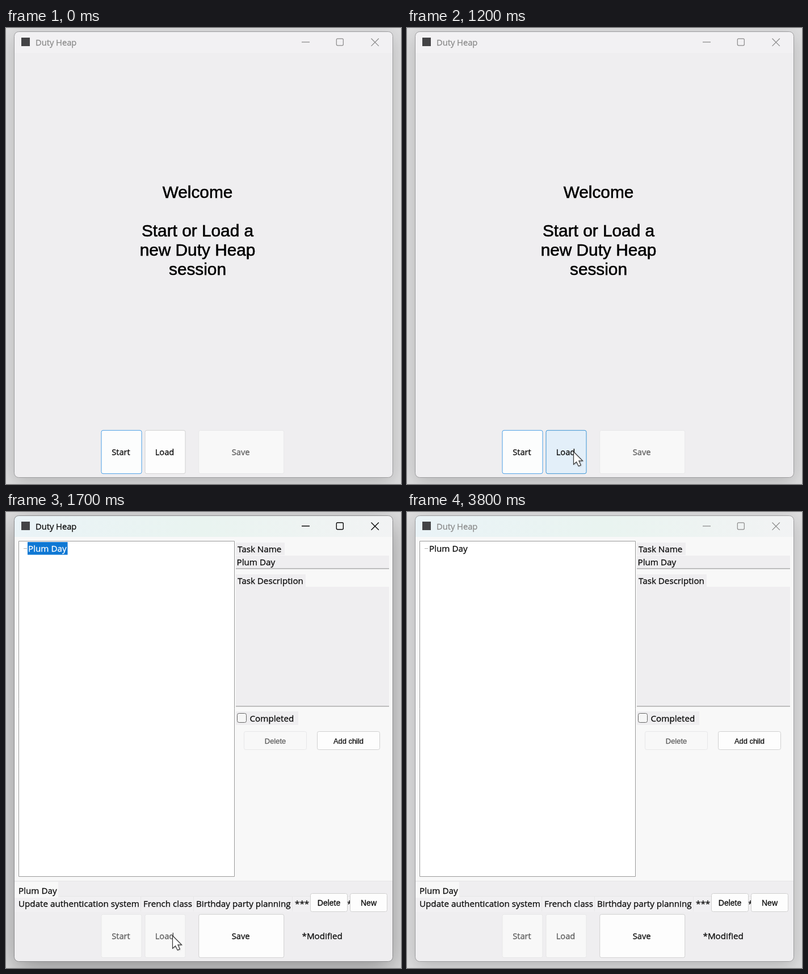
Write an HTML page with a canvas that moves like this. It is 696 by 805 pixels and loops after 3.9 s.

```html
<!DOCTYPE html>
<html lang="en">
<head>
<meta charset="utf-8">
<title>Task window</title>
<style>
html, body { margin: 0; width: 100%; height: 100%; overflow: hidden; background: #dededf; }
canvas { display: block; width: 696px; height: 805px; }
</style>
</head>
<body>
<canvas id="stage" width="696" height="805"></canvas>
<script>
const ctx = document.getElementById('stage').getContext('2d');
const LOOP = 3900, STEP = 100;
const APP = 'Duty Heap', TASK = 'Plum Day', PROJECT = 'Update authentication system';
const UI = '"Open Sans", "Noto Sans", sans-serif';
const SANS = '"Liberation Sans", Arial, sans-serif';
const FACE = '#efeef0', PAGE = '#f8f8f8', INK = '#0a0a0a', DIM = '#5c5c5c';
const BODY = 15.2, LABEL = 14.7, ROW = 22.65;

// [text, depth, done, expandable]
const TREE = [
  [PROJECT, 0, 0, 1],
  ['Obtain permission', 1, 1, 1],
  ['Email Molly', 2, 1, 0],
  ['IAM Roles', 2, 1, 1],
  ['Obtain from Crumbcake', 3, 1, 0],
  ['Make sure they work', 3, 1, 0],
  ['Install dependencies', 1, 0, 1],
  ['Try to compile', 2, 0, 0],
  ['Look for binaries', 2, 0, 0],
  ['Try looking on WQZ', 2, 0, 0],
  ['Figure out what to do from here', 1, 0, 0]
];

// Pointer path: [time, x, y]
const PATH = [
  [500, 572, 797], [600, 562, 772], [700, 470, 768], [800, 372, 761],
  [900, 320, 753], [1000, 301, 749], [1100, 293, 748], [1700, 293, 748],
  [1900, 297, 743], [2200, 300, 740], [2800, 300, 740], [2900, 309, 743], [3000, 350, 746]
];

function box(x, y, w, h, color) {
  ctx.fillStyle = color;
  ctx.fillRect(x, y, w, h);
}

function round(x, y, w, h, r, fill, stroke) {
  ctx.beginPath();
  ctx.roundRect(x, y, w, h, r);
  if (fill) { ctx.fillStyle = fill; ctx.fill(); }
  if (stroke) { ctx.strokeStyle = stroke; ctx.lineWidth = 1; ctx.stroke(); }
}

function line(color, width, ...pts) {
  ctx.beginPath();
  for (let i = 0; i < pts.length; i += 2) ctx.lineTo(pts[i], pts[i + 1]);
  ctx.strokeStyle = color;
  ctx.lineWidth = width;
  ctx.stroke();
}

// A hairline stroke gives the slightly heavier screen type.
function text(str, x, y, size = BODY, color = INK, align = 'left', family = UI) {
  ctx.font = size + 'px ' + family;
  ctx.textAlign = align;
  ctx.fillStyle = ctx.strokeStyle = color;
  ctx.lineWidth = size * .02;
  ctx.fillText(str, x, y);
  ctx.strokeText(str, x, y);
  return ctx.measureText(str).width;
}

function button(label, x, y, w, h, state, size = LABEL, family = UI) {
  const [fill, edge, ink] = {
    normal: ['#fdfdfd', '#d0d0d0', INK],
    first: ['#fcfdfd', '#4a9fe6', INK],
    hover: ['#e3eff9', '#3a93d4', INK],
    pressed: ['#e1ebf5', '#3a93cc', DIM],
    off: ['#f8f8f8', '#e7e7e8', DIM]
  }[state];
  round(x, y, w, h, 3, fill, edge);
  text(label, x + w / 2 - (family === UI ? 1 : 0), y + h / 2 + size * .4, size, ink, 'center', family);
}

function backdrop(active) {
  box(0, 0, 696, 805, '#dededf');
  ctx.save();
  ctx.shadowColor = active ? 'rgba(0,0,0,.36)' : 'rgba(0,0,0,.2)';
  ctx.shadowBlur = active ? 48 : 32;
  ctx.shadowOffsetY = active ? 14 : 8;
  round(14.5, 6.5, 667, 787, 8, FACE);
  ctx.restore();
}

function titleBar(active, loaded) {
  const tint = ctx.createLinearGradient(15, 0, 681, 0);
  const stops = loaded ? ['#eaf3f7', '#e9f4f0', '#f2f3f4']
    : active ? ['#f0f4f6', '#edf3f4', '#f2f3f4'] : ['#f2f1f3', '#f2f1f3', '#f2f1f3'];
  stops.forEach((c, i) => tint.addColorStop(i / 2, c));
  box(15, 7, 667, 37, tint);
  box(27, 17, 15, 15, '#434345');
  const ink = active ? INK : '#8a8a8a';
  text(APP, 52, 31, LABEL, ink);
  const w = active ? 1.4 : 1.2;
  line(ink, w, 521, 24.8, 535, 24.8);
  ctx.beginPath();
  ctx.roundRect(582.3, 18.8, 12, 12, 2);
  ctx.stroke();
  line(ink, w, 643.5, 18.5, 656.8, 31.8);
  line(ink, w, 656.8, 18.5, 643.5, 31.8);
}

function welcome() {
  [['Welcome', 300], ['Start or Load a', 368], ['new ' + APP, 402], ['session', 436]]
    .forEach(([s, y]) => text(s, 337.5, y, 29.8, '#000', 'center', SANS));
}

function selected(label, y) {
  ctx.font = BODY + 'px ' + UI;
  box(38, y - 12, ctx.measureText(label).width + 3, 22.5, '#0f78d4');
  text(label, 39, y + 5, BODY, '#fff');
}

function tree() {
  const mid = i => 65 + i * ROW;
  // [depth, first row, last row]
  [[1, 0, 10], [2, 1, 3], [3, 3, 5], [2, 6, 9]].forEach(([d, a, b]) => {
    const x = Math.round(31 + d * 12.9) + .5;
    line('#a8a8a8', 1, x, mid(a) + 10, x, mid(b));
  });
  TREE.forEach(([label, depth, done, open], i) => {
    const y = mid(i), x = 39 + depth * 12.9, cx = Math.round(x - 8) + .5, cy = Math.round(y) - .5;
    line('#a8a8a8', 1, cx, cy, x - 1, cy);
    if (open) {
      round(cx - 5, cy - 5, 10, 10, 1, '#fafafa', '#9b9b9b');
      line('#3f62a8', 1.2, cx - 3, cy, cx + 3, cy);
    }
    if (!i) return selected(label, y);
    const w = text(label, x, y + 5, BODY, done ? '#858585' : INK);
    if (done) line('#858585', 1, x, Math.round(y + 5) + .5, x + w, Math.round(y + 5) + .5);
  });
}

function fieldEdges() {
  [100, 343].forEach(y => line('#878787', 1, 405, y, 675, y));
}

// Half-painted window while the file opens
function opening() {
  box(15, 44, 667, 632, PAGE);
  line('#e6e6e7', 1, 240, 675.5, 681, 675.5);
  line('#a0a0a0', 1, 17.5, 527, 17.5, 46.5, 520.5, 46.5, 520.5, 49);
  box(22, 51, 381, 618, '#fff');
  ctx.save();
  ctx.beginPath();
  ctx.rect(22, 51, 380, 618);
  ctx.clip();
  tree();
  ctx.restore();
  round(22.5, 51.5, 380, 617, 0, null, '#9a9a9a');
  round(405.5, 75.5, 269, 25, 1, PAGE, '#e9e9e9');
  box(405, 131, 270, 212, FACE);
  fieldEdges();
  box(226, 272, 226, 170, FACE);
  welcome();
  box(15, 677, 225, 29, PAGE);
  text(PROJECT, 22, 700);
  button('Delete', 536.5, 673.5, 65, 32, 'normal', 14, SANS);
}

function editor(active) {
  box(15, 44, 667, 608, PAGE);
  line('#e6e6e7', 1, 15, 651.5, 681, 651.5);
  round(22.5, 51.5, 380, 592, 0, '#fff', '#9a9a9a');
  line('#b0b0b0', 1, 31, 64.5, 37, 64.5);
  if (active) selected(TASK, 65);
  else text(TASK, 39, 70);

  box(405, 54, 86, 22, FACE);
  text('Task Name', 408, 71);
  box(405, 77, 270, 23, FACE);
  text(TASK, 406.5, 94);
  box(405, 110, 123, 22, FACE);
  text('Task Description', 408, 127);
  box(405, 132, 270, 211, FACE);
  fieldEdges();
  box(405, 352, 110, 24, FACE);
  round(407.5, 355.5, 16, 16, 3, '#f6f6f6', '#666');
  text('Completed', 429.5, 370);
  button('Delete', 419.5, 387.5, 110, 32, 'off', 12.9, SANS);
  button('Add child', 548.5, 387.5, 110, 32, 'normal', 12.9, SANS);

  box(15, 679, 592, 27, '#f1f0f2');
  line('#e7e7e8', 1, 92, 678.5, 607, 678.5);
  [237.5, 330.5, 504.5].forEach(x => line('#e7e7e8', 1, x, 679, x, 705));
  box(15, 653, 77, 28, PAGE);
  text(TASK, 22, 674);
  text(PROJECT, 22, 697);
  text('French class', 242, 697);
  text('Birthday party planning', 335, 697);
  text('*** I', 509, 697);
  text('*', 601, 697);
  button('Delete', 536.5, 673.5, 65, 32, 'normal', 14, SANS);
  button('New', 606.5, 673.5, 65, 32, 'normal', 14, SANS);
  text('*Modified', 521.5, 754);
}

function arrow(x, y) {
  ctx.save();
  ctx.translate(x + .5, y);
  ctx.beginPath();
  [[0, 0], [0, 22.5], [5, 18], [8.8, 25.5], [12.8, 23.6], [9.4, 16.2], [16, 16.2]]
    .forEach(p => ctx.lineTo(...p));
  ctx.closePath();
  ctx.shadowColor = 'rgba(0,0,0,.3)';
  ctx.shadowBlur = 3;
  ctx.shadowOffsetX = ctx.shadowOffsetY = 1;
  ctx.fillStyle = '#fff';
  ctx.fill();
  ctx.shadowColor = 'transparent';
  ctx.strokeStyle = '#333';
  ctx.lineWidth = 1.2;
  ctx.stroke();
  ctx.restore();
}

function spinner(x, y, angle) {
  const arc = (r, a, b, color, w) => {
    ctx.beginPath();
    ctx.arc(x, y, r, a, b);
    ctx.strokeStyle = color;
    ctx.lineWidth = w;
    ctx.stroke();
  };
  arc(3.5, 0, 7, 'rgba(255,255,255,.5)', 7);
  arc(10.3, 0, 7, '#3796e8', 7);
  arc(10.3, angle - .7, angle + .7, '#83d3f8', 7);
}

function pointer(t) {
  if (t < PATH[0][0] || t > PATH[PATH.length - 1][0]) return;
  const i = Math.max(1, PATH.findIndex(p => p[0] >= t));
  const [t0, x0, y0] = PATH[i - 1], [t1, x1, y1] = PATH[i];
  const k = (t - t0) / (t1 - t0);
  arrow(x0 + (x1 - x0) * k, y0 + (y1 - y0) * k);
}

function draw(t) {
  const active = t >= 1300 && t < 3800;
  const loaded = t >= 1500, ready = t >= 1600;
  backdrop(active);
  ctx.save();
  ctx.beginPath();
  ctx.roundRect(14.5, 6.5, 667, 787, 8);
  ctx.clip();
  titleBar(active, loaded);
  if (ready) editor(active);
  else if (loaded) opening();
  else welcome();

  const hover = t >= 1000 && t < 1300;
  button('Start', 168, 710.3, 71, 76.4, t < 1300 ? 'first' : 'off');
  button('Load', 245, 710.3, 71, 76.4, ready ? 'off' : active ? 'pressed' : hover ? 'hover' : 'normal');
  button('Save', 339.7, 710.3, 150, 76.4, loaded ? 'normal' : 'off');
  ctx.restore();
  round(14.5, 6.5, 667, 787, 8, null, active ? '#8c8c8e' : '#9c9c9e');

  if (t >= 1400 && t < 1700) spinner(293, 748.5, 3.3 + (t - 1400) / 100 * .5);
  else pointer(t);
}

const start = performance.now();
function tick() {
  const t = (performance.now() - start) % LOOP;
  draw(Math.floor(t / STEP) * STEP);
  requestAnimationFrame(tick);
}
tick();
</script>
</body>
</html>
```
